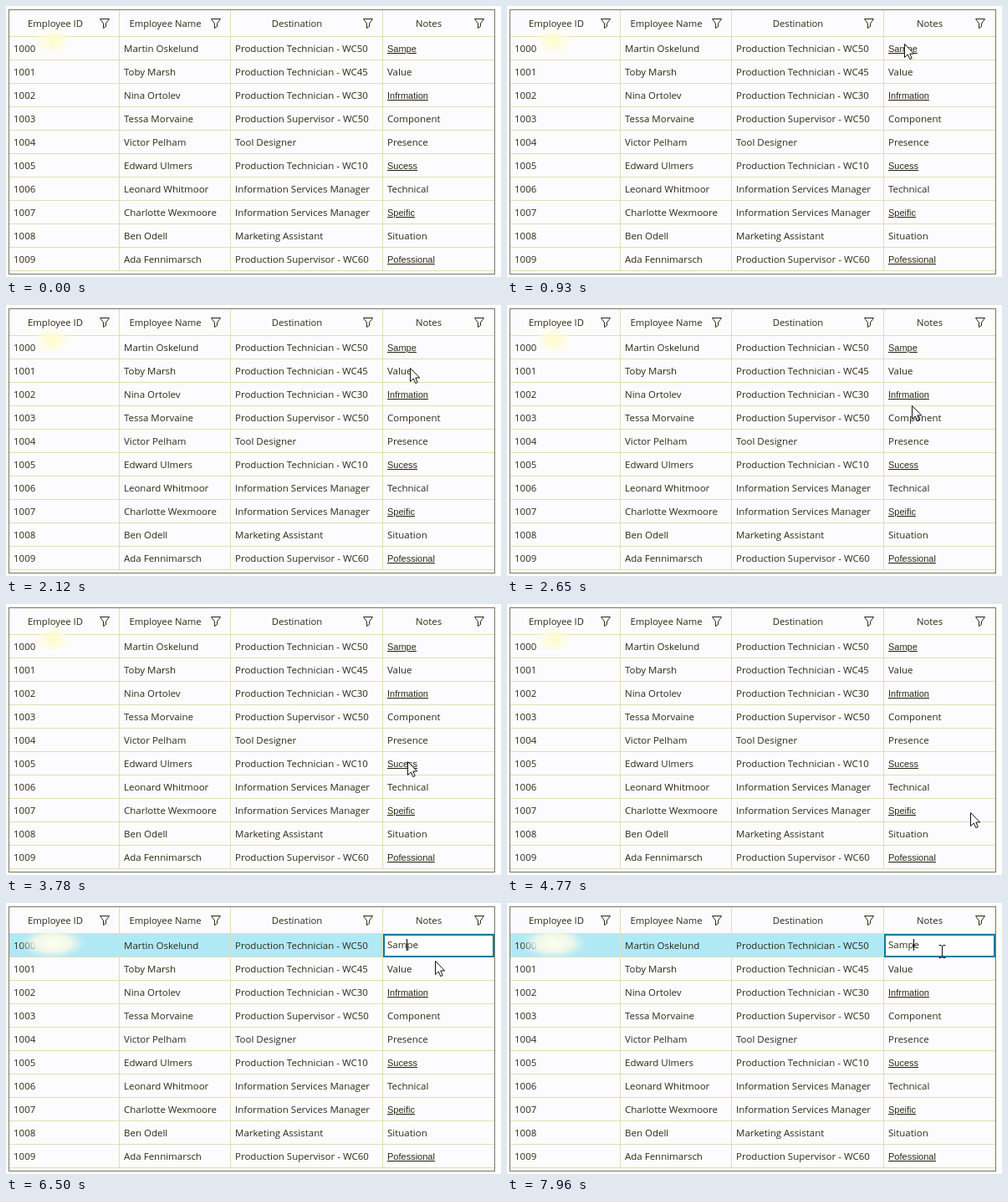
An HTML page for the animation above (8000 ms loop, 592 by 324 pixels).

```html
<!DOCTYPE html>
<html lang="en">
<head>
<meta charset="utf-8">
<title>Employee grid</title>
<style>
html, body { margin: 0; width: 100%; height: 100%; overflow: hidden; background: #fff; }
svg { display: block; }
text { font: 11.5px "Open Sans", "Noto Sans", sans-serif; fill: #2a2a12; white-space: pre; }
.link { font: 11px "Liberation Sans", Arial, sans-serif; text-decoration: underline; }
.line { stroke: #dfdfb4; }
.icon { fill: none; stroke: #2a2a12; }
</style>
</head>
<body>
<svg id="stage" width="592" height="324" viewBox="0 0 592 324">
  <defs>
    <radialGradient id="glow">
      <stop offset="0" stop-color="#fffcc4"/>
      <stop offset=".5" stop-color="#fffcd8" stop-opacity=".7"/>
      <stop offset="1" stop-color="#fffce8" stop-opacity="0"/>
    </radialGradient>
    <radialGradient id="glowWide">
      <stop offset="0" stop-color="#fffff0"/>
      <stop offset=".55" stop-color="#fafae8" stop-opacity=".85"/>
      <stop offset="1" stop-color="#e0f4ec" stop-opacity="0"/>
    </radialGradient>
  </defs>
  <rect x="3.5" y="4.5" width="581" height="316" fill="#fcfcff"/>
  <rect id="selected" x="4" y="37" width="446" height="27" fill="#b0e8f6"/>
  <g id="grid"></g>
  <rect x="3.5" y="4.5" width="581" height="316" fill="none" stroke="#777760"/>
  <ellipse id="spot" cx="56" cy="42" rx="24" ry="18" fill="url(#glow)"/>
  <ellipse id="wideSpot" cx="56" cy="48" rx="40" ry="19" fill="url(#glowWide)"/>
  <g id="editor">
    <rect x="452" y="38" width="131" height="26" fill="#fff" stroke="#087b9c" stroke-width="2"/>
    <text x="456" y="54">Sampe</text>
    <rect id="caret" y="43" width="1" height="14"/>
  </g>
  <path id="arrow" d="M.5.5V16.5L4.3 13 6.8 18.6 9.2 17.5 6.8 12H11.7Z" fill="#fff" stroke="#111"/>
  <path id="beam" d="M-3.5-6.5H-1L.5-5.5 2-6.5H4.5M.5-5.5V7.5M-3.5 8.5H-1L.5 7.5 2 8.5H4.5" fill="none" stroke="#111"/>
</svg>
<script>
const $ = id => document.getElementById(id);
const grid = $("grid");

function add(tag, attrs, content = "") {
  const el = document.createElementNS("http://www.w3.org/2000/svg", tag);
  for (const key in attrs) el.setAttribute(key, attrs[key]);
  el.textContent = content;
  grid.append(el);
  return el;
}

const technician = "Production Technician - WC", supervisor = "Production Supervisor - WC";
const manager = "Information Services Manager";
const rows = [
  ["Martin Oskelund", technician + 50, "Sampe", 1],
  ["Toby Marsh", technician + 45, "Value"],
  ["Nina Ortolev", technician + 30, "Infrmation", 1],
  ["Tessa Morvaine", supervisor + 50, "Component"],
  ["Victor Pelham", "Tool Designer", "Presence"],
  ["Edward Ulmers", technician + 10, "Sucess", 1],
  ["Leonard Whitmoor", manager, "Technical"],
  ["Charlotte Wexmoore", manager, "Speific", 1],
  ["Ben Odell", "Marketing Assistant", "Situation"],
  ["Ada Fennimarsch", supervisor + 60, "Pofessional", 1]
];

for (let i = 0; i < 11; i++) {
  const y = 36.5 + 28 * i;
  add("line", { x1: 4, x2: 584, y1: y, y2: y, class: "line" });
}
for (const x of [135.5, 268.5, 450.5])
  add("line", { x1: x, x2: x, y1: 5, y2: 317, class: "line" });

[["Employee ID", 59, 112], ["Employee Name", 190.5, 245], ["Destination", 348, 427], ["Notes", 505.5, 560]]
  .forEach(([title, x, icon]) => {
    add("text", { x, y: 25, "text-anchor": "middle", style: "font-size:11.3px" }, title);
    add("path", { d: `M${icon + .5} 15.5h11l-4 5.5v3.5l-3 2V21Z`, class: "icon" });
  });

let firstNote;
rows.forEach(([name, job, note, link], i) => {
  const y = 55 + 28 * i;
  [[9, 1000 + i], [141, name], [274, job]].forEach(([x, label]) => add("text", { x, y }, label));
  const el = add("text", { x: 456, y, class: link ? "link" : "" }, note);
  firstNote ??= el;
});

// Pointer keys: time, x, y
const path = [
  [66, 508, 7], [400, 500, 22], [860, 476, 43], [1591, 462, 60], [1800, 465, 60],
  [2300, 493, 84], [2590, 485, 108], [2652, 484, 120], [3000, 482, 150], [3450, 478, 181],
  [3779, 480, 188], [4100, 480, 246], [4310, 484, 285], [4640, 572, 308], [5170, 500, 73],
  [5500, 474, 54], [5834, 474, 56], [5970, 474, 56], [6300, 500, 62], [6497, 513, 69],
  [6700, 519, 67], [6900, 520, 57], [8000, 520, 57]
];

function pointer(t) {
  const i = Math.max(1, path.findIndex(key => key[0] >= t));
  const [t0, x0, y0] = path[i - 1], [t1, x1, y1] = path[i];
  const k = Math.max(0, (t - t0) / (t1 - t0));
  return [x0 + (x1 - x0) * k, y0 + (y1 - y0) * k].map(Math.round);
}

const show = (el, on) => el.setAttribute("visibility", on ? "visible" : "hidden");
const step = 66.3;

function draw(now) {
  const t = Math.floor((now % 8000 + 8) / step) * step;
  const editing = t >= 5900;
  const [x, y] = pointer(t);
  const overEditor = editing && y < 65;

  for (const id of ["selected", "wideSpot", "editor"]) show($(id), editing);
  show($("spot"), !editing);
  show(firstNote, !editing);
  $("caret").setAttribute("x", t < 7220 ? 479 : 486);

  show($("arrow"), t > 60 && !overEditor);
  show($("beam"), overEditor);
  for (const id of ["arrow", "beam"]) $(id).setAttribute("transform", `translate(${x} ${y})`);
}

const start = performance.now();
function loop() {
  draw(performance.now() - start);
  requestAnimationFrame(loop);
}
loop();
</script>
</body>
</html>
```
